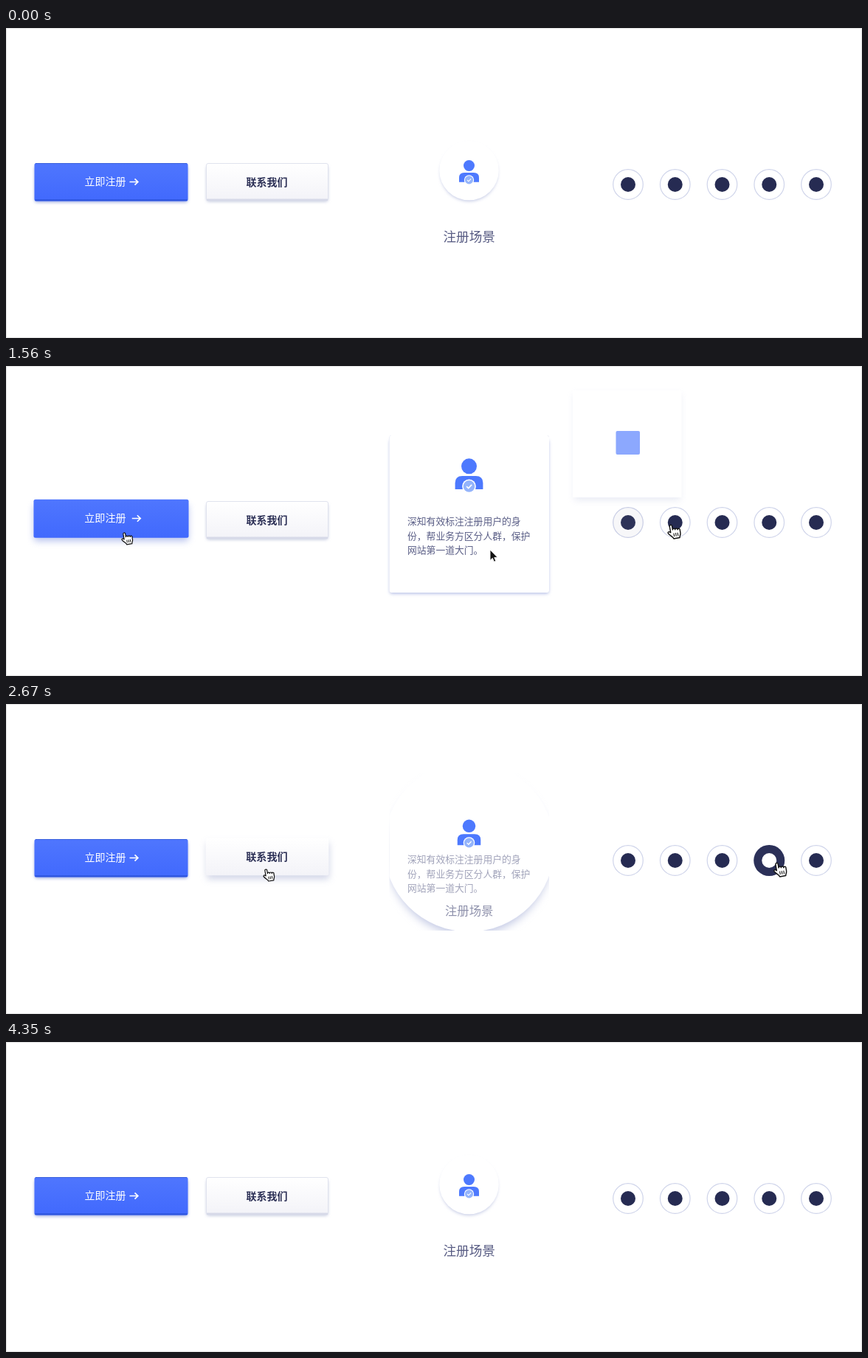
An HTML page for the animation above (4380 ms loop, 1160 px wide and 420 px high).

```html
<!DOCTYPE html>
<html lang="zh-CN">
<head>
<meta charset="utf-8">
<title>Hover states</title>
<style>
  html, body { margin: 0; width: 100%; height: 100%; overflow: hidden; background: #fff; }
  svg { display: block; width: 1160px; height: 420px; }
  text { font-family: "Noto Sans CJK SC", "Noto Sans CJK", "Noto Sans", sans-serif; }
</style>
</head>
<body>
<svg viewBox="0 0 1160 420">
  <defs>
    <linearGradient id="blue" x2="0" y2="1">
      <stop stop-color="#4f76fe"/><stop offset="1" stop-color="#4169fd"/>
    </linearGradient>
    <linearGradient id="pale" x2="0" y2="1">
      <stop stop-color="#fff"/><stop offset="1" stop-color="#f3f3f8"/>
    </linearGradient>
    <filter id="soft" x="-20%" y="-60%" width="140%" height="220%"><feGaussianBlur stdDeviation="2"/></filter>
    <filter id="wide" x="-20%" y="-60%" width="140%" height="220%"><feGaussianBlur stdDeviation="5"/></filter>
    <clipPath id="box"><rect x="519.5" y="94" width="216.5" height="213" rx="3"/></clipPath>
    <path id="arrow" d="M0 0V16L3.7 12.6 6 18 8.7 16.9 6.4 11.6H11.3Z" fill="#111" stroke="#fff" stroke-linejoin="round"/>
    <g id="hand" transform="rotate(-10) translate(-5.5 -.8)" stroke="#111">
      <path d="M4 10V2.3a1.5 1.5 0 0 1 3 0V7a1.5 1.5 0 0 1 3 .3 1.5 1.5 0 0 1 3 .6 1.4 1.4 0 0 1 2.8.8V12c0 3-1.5 3.5-1.8 6H6.5C6 15.5 3 14 .9 10.6 .1 9.1 1.8 8.1 2.9 9Z" fill="#fff" stroke-width="1.3" stroke-linejoin="round"/>
      <path d="M7.6 11.5v4M10 11.5v4M12.4 11.5v4"/>
    </g>
  </defs>

  <rect x=".5" y=".5" width="1159" height="419" fill="#fff" stroke="#e3e3e3"/>

  <g id="signup">
    <rect class="lift" x="39" y="190" width="207" height="49" rx="3" fill="#8c9de3" filter="url(#wide)"/>
    <rect class="rest" x="39" y="187" width="207" height="49" rx="3" fill="#97a5dd" filter="url(#soft)"/>
    <rect x="38.5" y="183" width="208" height="51.5" rx="2.5" fill="url(#blue)"/>
    <g class="rest" fill="none">
      <path d="M40 183.5h205" stroke="#3b62dc"/>
      <path d="M39.5 233.2h206" stroke="#2d54dc" stroke-width="2"/>
    </g>
    <text x="106.5" y="213" font-size="14" font-weight="500" fill="#fff">立即注册</text>
    <path id="go" d="M167.5 208.5h11M174.5 204.3l4.3 4.2-4.3 4.2" fill="none" stroke="#fff" stroke-width="1.7"/>
  </g>

  <g id="contact">
    <rect class="lift" x="273" y="190" width="164" height="49" rx="3" fill="#b4bad8" filter="url(#wide)"/>
    <rect class="rest" x="272" y="187" width="164" height="48" rx="3" fill="#b9bfd9" filter="url(#soft)"/>
    <rect x="271.5" y="183.5" width="165" height="50.5" rx="2.5" fill="url(#pale)"/>
    <g class="rest" fill="none">
      <rect x="271.5" y="183.5" width="165" height="50.5" rx="2.5" stroke="#e0e3ee"/>
      <path d="M272 232.8h164" stroke="#d6d9e8" stroke-width="2.4"/>
    </g>
    <text x="325.5" y="214.3" font-size="14" font-weight="700" fill="#2b2f55">联系我们</text>
  </g>

  <g id="card">
    <rect x="520" y="100" width="215.5" height="208.5" rx="3" fill="#b4bee6" filter="url(#soft)"/>
    <rect x="519.5" y="94" width="216.5" height="213" rx="3" fill="#fff"/>
  </g>
  <g clip-path="url(#box)">
    <g id="disc">
      <circle cy="3" r="38.8" fill="#c3c9e4" filter="url(#soft)"/>
      <circle r="40.2" fill="#fff"/>
    </g>
  </g>
  <g id="user" fill="#4d79fe">
    <circle cy="-7" r="7.5"/>
    <path d="M-13.5 15.2V9.2q0-6.8 7-6.8h13q7 0 7 6.8v6z"/>
    <circle cy="12.4" r="6.7" fill="#fff"/>
    <circle cy="12.4" r="5.6" fill="#94b4fb"/>
    <path d="M-2.4 12.5l1.8 1.8 3.2-3.4" fill="none" stroke="#fff" stroke-width="1.1"/>
  </g>
  <g id="note" font-size="12.8" fill="#5a5e86">
    <text x="544" y="215.2">深知有效标注注册用户的身</text>
    <text x="544" y="234.8">份，帮业务方区分人群，保护</text>
    <text x="544" y="254.4">网站第一道大门。</text>
  </g>
  <text id="title" y="6.5" font-size="17.6" text-anchor="middle" fill="#565a82">注册场景</text>

  <g id="popup">
    <rect x="770" y="38" width="144" height="144" fill="#c3c9e2" opacity=".55" filter="url(#wide)"/>
    <rect x="768" y="33" width="147.5" height="145" fill="#fff"/>
    <rect x="826.5" y="88" width="32.5" height="32" rx="2" fill="#4d79fe"/>
  </g>
  <g id="links"></g>
  <g id="cursors"></g>
</svg>
<script>
const LOOP = 4380;
const $ = id => document.getElementById(id);
const set = (el, attrs) => { for (const k in attrs) el.setAttribute(k, attrs[k]); };
const add = (parent, tag, attrs = {}) => {
  const el = document.createElementNS("http://www.w3.org/2000/svg", tag);
  set(el, attrs);
  return parent.appendChild(el);
};
const mix = (a, b, p) => a + (b - a) * p;
const clamp = x => Math.min(1, Math.max(0, x));
const smooth = x => (x = clamp(x), x * x * (3 - 2 * x));

// cubic-bezier(.25, .1, .25, 1)
function ease(x) {
  x = clamp(x);
  if (x === 1) return 1;
  let lo = 0, hi = 1;
  for (let i = 0; i < 18; i++) {
    const s = (lo + hi) / 2;
    if (.75 * s * (1 - s) + s ** 3 < x) lo = s; else hi = s;
  }
  const r = 1 - lo;
  return .3 * r * r * lo + 3 * r * lo * lo + lo ** 3;
}

// Each cursor starts below the stage and makes a few eased moves
const move = (from, ms, x, y) => ({ from, ms, x, y });
function position({ x, y, moves }, t) {
  for (const m of moves) {
    const p = smooth((t - m.from) / m.ms);
    x = mix(x, m.x, p);
    y = mix(y, m.y, p);
  }
  return [x, y];
}

const linkX = [0, 1, 2, 3, 4].map(i => 843 + 63.75 * i);
const restX = i => linkX[i] + (i % 3 ? -5 : 10);

const left = {
  size: .95, x: 310, y: 426,
  moves: [move(60, 480, 128, 224), move(1000, 550, 160, 226), move(1700, 320, 352, 224), move(2660, 940, 412, 426)]
};
const middle = {
  size: .9, x: 690, y: 426,
  moves: [move(150, 850, 668, 258), move(1000, 300, 656, 249), move(2500, 160, 672, 426)]
};
const right = {
  size: 1.1, x: 1128, y: 426,
  moves: [
    move(40, 680, restX(0), 215),
    ...[1, 2, 3, 4].map(i => move(1325 + 462 * (i - 1), 260, restX(i), 215.5)),
    move(3300, 850, 1150, 426)
  ]
};

// Hover time span, read off the cursor's path
function hoverSpan(cursor, hit, delay = 0) {
  const times = [];
  for (let t = 0; t < LOOP; t += 2) if (hit(...position(cursor, t))) times.push(t);
  return [times[0] + delay, times[times.length - 1] + delay];
}
const inBox = (x0, x1) => (x, y) => x > x0 && x < x1 && y < 235;
const inCircle = (cx, cy, r) => (x, y) => Math.hypot(x - cx, y - cy) < r;
const hover = (t, [on, off], ms) => ease((t - on) / ms) * (1 - ease((t - off) / ms));

const signupSpan = hoverSpan(left, inBox(38, 247));
const contactSpan = hoverSpan(left, inBox(271, 437));
const cardSpan = hoverSpan(middle, inCircle(627.5, 193, 85));

const links = linkX.map(x => {
  const g = add($("links"), "g", { transform: `translate(${x} 212)` });
  add(g, "circle", { r: 20.3, fill: "#fff", stroke: "#cfd4ea", "stroke-width": 1.2 });
  const disc = add(g, "circle", { r: 21, fill: "#2b3058" });
  add(g, "circle", { r: 10, fill: "#262b52" });
  const lit = add(g, "circle", { r: 10, fill: "#fff" });
  return { span: hoverSpan(right, inCircle(x, 212, 18), 80), parts: [disc, lit] };
});

left.hits = [inBox(38, 247), inBox(271, 437)];
middle.hits = [];
right.hits = linkX.slice(1).map(x => inCircle(x, 212, 18));
const cursors = [left, middle, right];
for (const c of cursors) {
  c.el = add($("cursors"), "g");
  c.icon = add(c.el, "use");
}

function drawButton(id, cx, p) {
  const g = $(id);
  set(g, { transform: `translate(${cx} ${208.5 - 2 * p}) scale(${1 + .01 * p}) translate(${-cx} -208.5)` });
  g.querySelectorAll(".rest").forEach(el => set(el, { opacity: 1 - p }));
  set(g.querySelector(".lift"), { opacity: .6 * p });
}

function drawCard(t) {
  const p = hover(t, cardSpan, 400);
  const q = hover(t, cardSpan, 350);
  set($("disc"), { transform: `translate(627.5 193) scale(${mix(1, 5.5, p)})` });
  set($("card"), { opacity: clamp((p - .8) * 5) });
  set($("user"), { transform: `translate(627.5 ${mix(193.5, 145.6, p)}) scale(${mix(1, 1.4, p)})` });
  set($("note"), { opacity: hover(t, cardSpan, 520) });
  set($("title"), {
    opacity: 1 - q,
    transform: `translate(627.7 ${mix(282, 277, q)}) scale(${mix(1, .79, q)})`
  });
}

function drawCursor(c, t) {
  const [x, y] = position(c, t);
  set(c.el, { transform: `translate(${x} ${y}) scale(${c.size})` });
  set(c.icon, { href: c.hits.some(hit => hit(x, y)) ? "#hand" : "#arrow" });
}

function draw(t) {
  const p = hover(t, signupSpan, 300);
  drawButton("signup", 142.5, p);
  set($("go"), { transform: `translate(${3 * p} 0)` });
  drawButton("contact", 354, hover(t, contactSpan, 300));
  drawCard(t);
  set($("popup"), { opacity: hover(t, links[0].span, 400) });
  for (const { span, parts } of links) {
    const opacity = hover(t, span, 120);
    parts.forEach(el => set(el, { opacity }));
  }
  cursors.forEach(c => drawCursor(c, t));
}

const start = performance.now();
function tick() {
  draw((performance.now() - start) % LOOP);
  requestAnimationFrame(tick);
}
tick();
</script>
</body>
</html>
```
